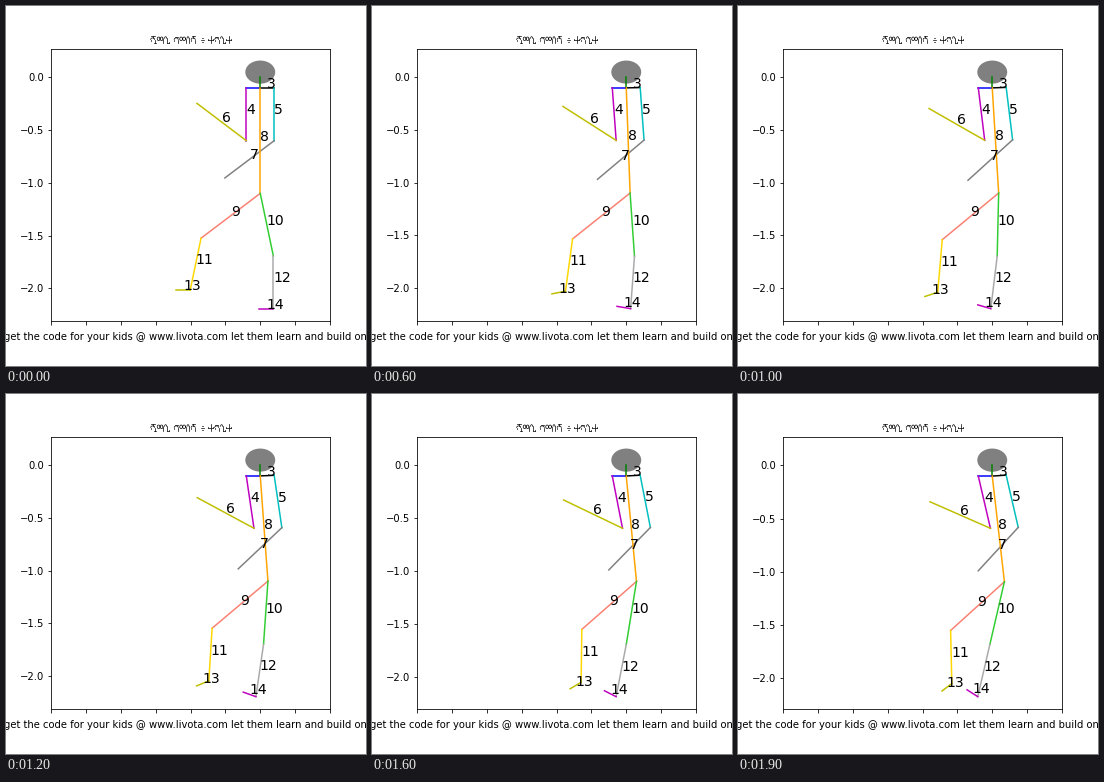
These frames come from a looping animation (360 by 360 pixels, 2000 ms). A matplotlib script:

```python
import numpy as np
import matplotlib.pyplot as plt
from matplotlib.animation import FuncAnimation
from matplotlib.lines import Line2D
from matplotlib.patches import Circle

SIZE = 360
FRAMES = 20
HEAD_Y, HEAD_R = 0.05, 0.1
NECK, LEFT = (0, -0.1), (-0.1, -0.1)
COLORS = dict(enumerate(
    "k m c y gray orange salmon limegreen gold darkgray y m".split(), start=3))


def pose(n):
    """Both ends of every bone; angles run from straight down to the right."""
    t = n / (FRAMES - 1)
    lean, swing = 5 * t, 10 * t
    bones = {}

    def bone(key, start, length, angle):
        a = np.radians(angle)
        end = (start[0] + length * np.sin(a), start[1] - length * np.cos(a))
        bones[key] = (start, end)
        return end

    shoulder = bone(3, NECK, 0.1, 90 + lean)
    bone(6, bone(4, LEFT, 0.5, swing), 0.5, 1.5 * swing - 135)
    bone(7, bone(5, shoulder, 0.5, swing), 0.5, swing - 45)

    hip = bone(8, NECK, 1.0, lean)
    back_knee = bone(9, hip, 0.6, lean - 45)
    back_heel = bone(11, back_knee, 0.5, swing - 9)
    bone(13, back_heel, 0.1, 4.5 * swing - 90)
    front_knee = bone(10, hip, 0.6, 9 - 1.9 * swing)
    front_heel = bone(12, front_knee, 0.5, -swing)
    bone(14, front_heel, 0.1, -4 * swing - 90)
    return bones


# Pen strokes for the title letters, in pixels above the baseline
def bar(x0, x1, y):
    return [(x0, y), (x1, y)]


def stem(x, y0=0, y1=7):
    return [(x, y0), (x, y1)]


def arc(cx, cy, rx, ry, turn=360):
    a = np.radians(np.linspace(0, turn, 16))
    return np.column_stack([cx + rx * np.cos(a), cy + ry * np.sin(a)])


def arch():
    return [arc(2.7, 3.8, 2, 1.6, 180), stem(0.7, 2, 3.8), stem(4.7, 0, 3.8)]


LETTERS = {
    "ጀ": arch() + [stem(2.7, 5.4), bar(0.7, 4.7, 7), bar(4, 6, 0)],
    "ማ": [arc(1.6, 4.5, 1.4, 1.8), arc(4.6, 4.5, 1.4, 1.8), stem(6, 0, 4.5)],
    "ሪ": [arc(1.6, 5, 1, 1.6, 180), stem(2.6, 0, 5), bar(2.6, 4.6, 0),
          stem(4.6, 0, 1.5)],
    "ኮ": arch() + [bar(1, 4.4, 6.8)],
    "ን": [arc(1.5, 5, 1, 1.6, 180), stem(2.5, 0, 5)],
    "ዶ": arch() + [stem(2.7, 5.4), bar(1.2, 4.2, 7)],
    "ተ": [stem(2.8), bar(0.4, 5.2, 3.8), stem(0.4, 3.8, 4.8),
          stem(5.2, 3.8, 4.8)],
    "፥": [bar(1, 2, 5.5), bar(0.5, 2.5, 3.6), bar(1, 2, 1.5)],
}
ADVANCE = {"ጀ": 7, "ማ": 7, "ን": 4}


def write(word, x, y=322.7):
    for ch in word:
        for stroke in LETTERS[ch]:
            px, py = ((np.array(stroke) + (x, y)) / SIZE).T
            fig.add_artist(Line2D(px, py, color="k", lw=0.7))
        x += ADVANCE.get(ch, 6)


fig = plt.figure(figsize=(5, 5), dpi=72, facecolor="white")
ax = fig.add_axes([0.125, 0.125, 0.775, 0.755])
ax.set_xlim(-1.5, 0.5)
ax.set_xticks(np.linspace(-1.5, 0.5, 9))
ax.set_xticklabels([])
ax.set_yticks(np.arange(-4, 1) / 2)
ax.set_xlabel("get the code for your kids @ www.livota.com "
              "let them learn and build on it")

for word, x in (("ጀማሪ", 144), ("ኮማንዶ", 167.5), ("፥", 195), ("ተኮሪተ", 202)):
    write(word, x)

ax.add_patch(Circle((0, HEAD_Y), HEAD_R, color="gray", lw=2))
ax.plot([0, 0], [0, -0.1], "g")
ax.plot(*zip(LEFT, NECK), "b")
lines = {k: ax.plot([], [], color=c)[0] for k, c in COLORS.items()}
labels = {k: ax.text(0, 0, str(k), fontsize=14) for k in COLORS}


def update(n):
    bones = pose(n)
    for key, ends in bones.items():
        lines[key].set_data(*zip(*ends))
        labels[key].set_position(np.mean(ends, axis=0))
    # the vertical range follows the lowest joint with a 5 % margin
    low = min(end[1] for _, end in bones.values())
    high = HEAD_Y + HEAD_R
    pad = 0.05 * (high - low)
    ax.set_ylim(low - pad, high + pad)
    return [*lines.values(), *labels.values()]


anim = FuncAnimation(fig, update, frames=FRAMES, interval=100,
                     init_func=lambda: update(0), repeat=True, repeat_delay=0)
plt.show()
```
